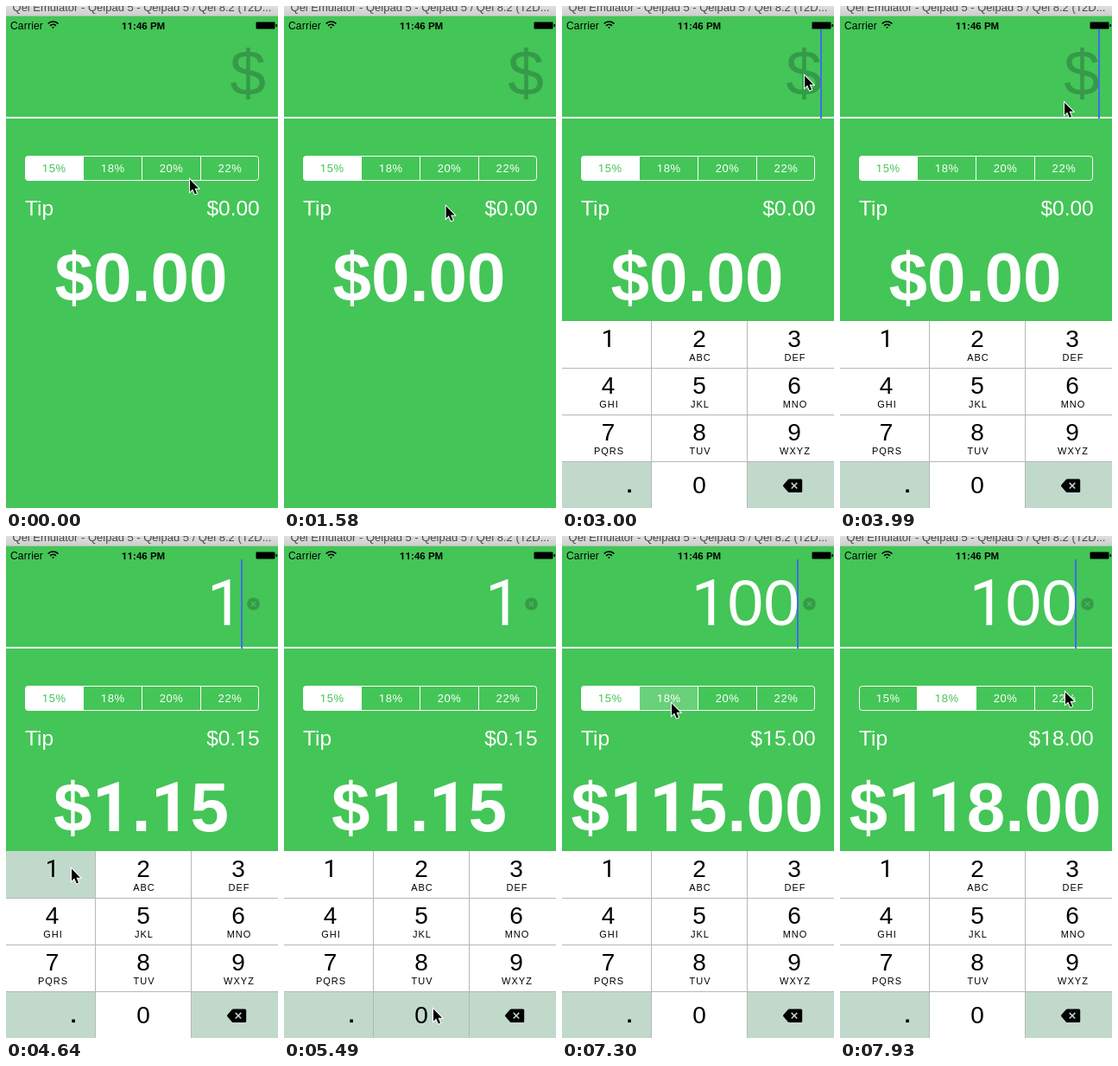
An HTML page with a canvas that plays this animation: 315x580 px, repeating every 8 s.

```html
<!DOCTYPE html>
<html lang="en">
<head>
<meta charset="utf-8">
<title>Tip calculator</title>
<style>
  html, body { margin: 0; width: 100%; height: 100%; overflow: hidden; }
  canvas { display: block; }
</style>
</head>
<body>
<canvas id="stage" width="315" height="580"></canvas>
<script>
const ctx = document.getElementById('stage').getContext('2d');
const LOOP = 8000;
const GREEN = '#44c557', DIM = '#359a49', WHITE = '#fff', BLACK = '#000';
const KEY_TINT = '#c1d9cb', KEY_LINE = '#b4b8b6', CARET = '#426bf2';
const SANS = '"Liberation Sans", sans-serif', PLAIN_ONE = 'Roboto, sans-serif';

// Pointer path: time, x, y
const pointer = [
  [0, 212, 199], [80, 212, 199], [130, 217, 206], [260, 186, 231],
  [1560, 186, 231], [1940, 261, 100], [2080, 261, 100], [2220, 281, 76],
  [2640, 281, 77], [3000, 280, 79], [3870, 280, 79], [4480, 75, 383],
  [4720, 75, 383], [5350, 172, 545], [6100, 172, 545], [6470, 155, 166],
  [6550, 148, 137], [6570, 148, 137], [6730, 126, 192], [7790, 126, 192],
  [7930, 260, 179], [LOOP, 260, 179]
];
const presses = [
  { key: '1', down: 4540, type: 4620, up: 4660 },
  { key: '0', down: 5430, type: 5500, up: 5550 },
  { key: '0', down: 5760, type: 5830, up: 5870 }
];
const FOCUS = 2550, KEYBOARD = 2574, SEGMENT_DOWN = 7220, SEGMENT_UP = 7310;
const rates = [15, 18, 20, 22];
const keys = [
  ['1', ''], ['2', 'ABC'], ['3', 'DEF'],
  ['4', 'GHI'], ['5', 'JKL'], ['6', 'MNO'],
  ['7', 'PQRS'], ['8', 'TUV'], ['9', 'WXYZ'],
  ['.', ''], ['0', ''], ['back', '']
];

const clamp = v => Math.max(0, Math.min(1, v));
const smooth = v => v * v * (3 - 2 * v);

function rect(x, y, w, h, color) {
  ctx.fillStyle = color;
  ctx.fillRect(x, y, w, h);
}

// The digit 1 is set in a face that draws it without a foot.
function text(str, x, y, size, color, align = 'left', spacing = 0) {
  ctx.fillStyle = color;
  ctx.letterSpacing = spacing + 'px';
  const runs = str.split(/(1)/).map(part => {
    const font = `${size} ${part === '1' ? PLAIN_ONE : SANS}`;
    ctx.font = font;
    return { part, font, width: ctx.measureText(part).width };
  });
  const total = runs.reduce((sum, run) => sum + run.width, -spacing);
  x -= total * { left: 0, center: 0.5, right: 1 }[align];
  for (const { part, font, width } of runs) {
    ctx.font = font;
    ctx.fillText(part, x, y);
    x += width;
  }
}

function polygon(points) {
  ctx.beginPath();
  points.forEach(([x, y]) => ctx.lineTo(x, y));
  ctx.closePath();
}

function roundRect(x, y, w, h, r) {
  ctx.beginPath();
  ctx.roundRect(x, y, w, h, r);
}

function cross(x, y, r, color, width) {
  ctx.strokeStyle = color;
  ctx.lineWidth = width;
  ctx.beginPath();
  ctx.moveTo(x - r, y - r);
  ctx.lineTo(x + r, y + r);
  ctx.moveTo(x + r, y - r);
  ctx.lineTo(x - r, y + r);
  ctx.stroke();
}

function drawTopBars() {
  const bar = ctx.createLinearGradient(0, 0, 0, 11);
  bar.addColorStop(0, '#dedede');
  bar.addColorStop(1, '#cfcfcf');
  rect(0, 0, 315, 11, bar);
  rect(0, 11, 315, 1, '#a5c9aa');
  text('Qel Emulator - Qelpad 5 - Qelpad 5 / Qel 8.2 (12D...', 157.5, 6,
    '13px', '#4a4a4a', 'center');

  text('Carrier', 5, 27, '12px', BLACK, 'left', 0.2);
  text('11:46 PM', 159, 27, '700 11.5px', BLACK, 'center');
  ctx.strokeStyle = BLACK;
  ctx.lineWidth = 1.7;
  for (const r of [1, 4.6, 8]) {
    ctx.beginPath();
    ctx.arc(54.5, 26, r, -Math.PI * 0.76, -Math.PI * 0.24);
    ctx.stroke();
  }
  ctx.strokeStyle = 'rgba(0,0,0,.5)';
  ctx.lineWidth = 1;
  roundRect(289.5, 18.5, 22, 8, 1.5);
  ctx.stroke();
  rect(290, 19, 21, 7, BLACK);
  rect(312.5, 21, 1.5, 3, BLACK);
}

function caretAlpha(t) {
  if (t < FOCUS) return 0;
  const reset = Math.max(FOCUS, ...presses.filter(p => t >= p.type).map(p => p.type + 15));
  const since = t - reset - 570;
  if (since < 0) return 1;
  const phase = since % 940;
  return phase < 430 ? clamp(1 - phase / 120) : clamp((phase - 430) / 90);
}

function drawBill(t, bill) {
  if (bill) {
    text(bill, 275, 102.5, '75px', WHITE, 'right');
    ctx.fillStyle = DIM;
    ctx.beginPath();
    ctx.arc(286.5, 78.5, 7.3, 0, Math.PI * 2);
    ctx.fill();
    cross(286.5, 78.5, 2.6, GREEN, 1.3);
  } else {
    text('$', 301, 102.5, '75px', DIM, 'right');
  }
  rect(0, 128, 315, 2, WHITE);
  ctx.globalAlpha = caretAlpha(t);
  rect(bill ? 272 : 299, 27, 2, 103, CARET);
  ctx.globalAlpha = 1;
}

function drawSegments(t, selected) {
  ctx.save();
  roundRect(22.5, 173.5, 270, 28, 3);
  ctx.clip();
  rect(22 + selected * 67.75, 173, 68, 29, WHITE);
  if (t >= SEGMENT_DOWN && t < SEGMENT_UP) rect(90, 173, 67, 29, 'rgba(255,255,255,.2)');
  for (const x of [89, 157, 225]) rect(x, 173, 1, 29, WHITE);
  ctx.restore();
  ctx.strokeStyle = WHITE;
  ctx.lineWidth = 1;
  roundRect(22.5, 173.5, 270, 28, 3);
  ctx.stroke();
  rates.forEach((rate, i) => text(rate + '%', 55.5 + i * 67.9, 192,
    '13px', i === selected ? GREEN : WHITE, 'center', 0.6));
}

function drawBackspace(y) {
  ctx.fillStyle = ctx.strokeStyle = BLACK;
  ctx.lineWidth = 3;
  ctx.lineJoin = 'round';
  polygon([[257.5, y], [263, y - 6.2], [276.7, y - 6.2], [276.7, y + 6.2], [263, y + 6.2]]);
  ctx.fill();
  ctx.stroke();
  cross(269, y, 3.3, KEY_TINT, 1.5);
}

function drawKeyboard(t) {
  if (t < KEYBOARD) return;
  const w = (t - KEYBOARD) * 0.02;
  const top = Math.round(364 + 216 * (1 + w) * Math.exp(-w));
  const edges = [0, 104, 215, 315], centers = [53.5, 159, 269];
  const pressed = presses.find(p => t >= p.down && t < p.up);
  rect(0, top, 315, 216, WHITE);
  keys.forEach(([label, sub], i) => {
    const col = i % 3, y = top + Math.floor(i / 3) * 54, x = centers[col];
    const tinted = label === '.' || label === 'back' || (pressed && pressed.key === label);
    if (tinted) rect(edges[col], y, edges[col + 1] - edges[col], 54, KEY_TINT);
    if (label === '.') rect(76.3, y + 32.5, 3.6, 3.6, BLACK);
    else if (label === 'back') drawBackspace(y + 28.2);
    else text(label, x, y + (label === '0' ? 37 : 30), '28px', BLACK, 'center');
    text(sub, x + 0.5, y + 45.5, '11px', BLACK, 'center', 1);
  });
  for (const x of [103, 214]) rect(x, top, 1, 216, KEY_LINE);
  for (let row = 1; row < 4; row++) rect(0, top + row * 54, 315, 1, KEY_LINE);
}

function drawPointer(t) {
  const i = pointer.findIndex(p => p[0] > t);
  const [t0, x0, y0] = pointer[i - 1], [t1, x1, y1] = pointer[i];
  const k = smooth((t - t0) / (t1 - t0));
  ctx.save();
  ctx.translate(x0 + (x1 - x0) * k + 1, y0 + (y1 - y0) * k + 1.5);
  polygon([[0, 0], [0, 14], [3.2, 11], [5.8, 17], [8, 16], [5.5, 10.2], [10, 10.2]]);
  ctx.lineJoin = 'miter';
  ctx.strokeStyle = WHITE;
  ctx.lineWidth = 2;
  ctx.stroke();
  ctx.fillStyle = BLACK;
  ctx.fill();
  ctx.restore();
}

function draw(now) {
  const t = now % LOOP;
  const bill = presses.filter(p => t >= p.type).map(p => p.key).join('');
  const selected = t >= SEGMENT_UP ? 1 : 0;
  const tip = bill * rates[selected] / 100;

  rect(0, 0, 315, 580, GREEN);
  drawTopBars();
  drawBill(t, bill);
  drawSegments(t, selected);
  text('Tip', 22, 242, '24.5px', WHITE);
  text('$' + tip.toFixed(2), 293.7, 242, '24.5px', WHITE, 'right');
  text('$' + (+bill + tip).toFixed(2), 156.5, 341, '700 80px', WHITE, 'center');
  drawKeyboard(t);
  drawPointer(t);
  requestAnimationFrame(draw);
}
requestAnimationFrame(draw);
</script>
</body>
</html>
```
